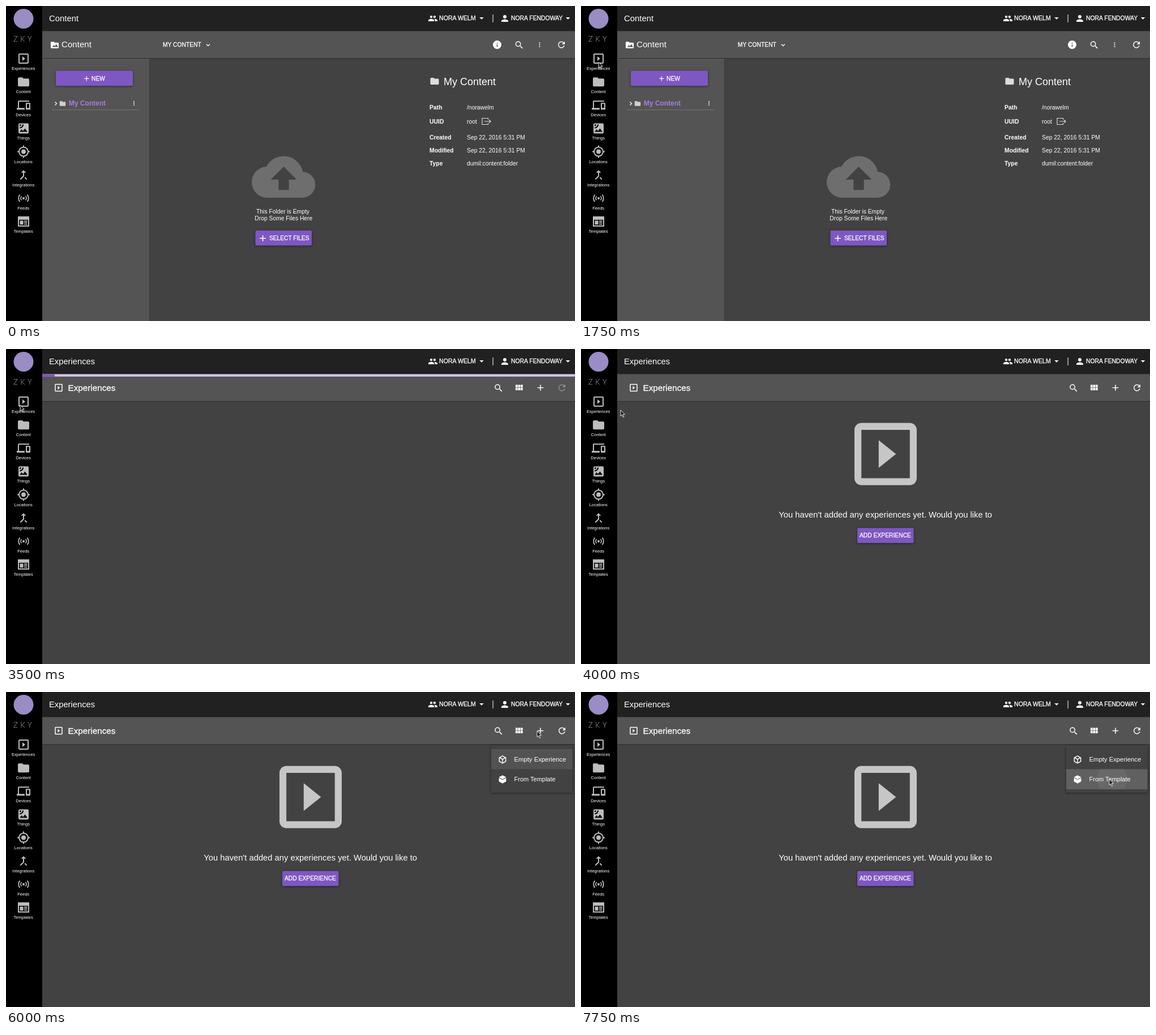
These frames come from a looping animation (1005 px wide and 557 px high, 8000 ms). An HTML page:

```html
<!DOCTYPE html>
<html lang="en">
<head>
<meta charset="utf-8">
<title>Content manager</title>
<style>
  html, body { margin: 0; width: 100%; height: 100%; overflow: hidden; background: #424242; }
  svg { display: block; width: 1005px; height: 557px; font-family: "Liberation Sans", Arial, sans-serif; }
  .medium { stroke: #fff; stroke-width: .3px; }
  .bold { font-weight: 700; }
  .thin { font-family: Lato, sans-serif; font-weight: 300; letter-spacing: 4.5px; }
  .middle { text-anchor: middle; }
  .raised { filter: drop-shadow(0 1px 2px rgba(0, 0, 0, .45)); }
</style>
</head>
<body>
<svg id="stage" viewBox="0 0 1005 557"></svg>
<script>
// Icon outlines on a 24 unit grid
const ICONS = {
  play: 'M10 8v8l5-4zM19 3H5c-1.1 0-2 .9-2 2v14c0 1.1.9 2 2 2h14c1.1 0 2-.9 2-2V5c0-1.1-.9-2-2-2zm0 16H5V5h14z',
  folder: 'M10 4H4c-1.1 0-2 .9-2 2v12c0 1.1.9 2 2 2h16c1.1 0 2-.9 2-2V8c0-1.1-.9-2-2-2h-8z',
  album: 'M10 4H4c-1.1 0-2 .9-2 2v12c0 1.1.9 2 2 2h16c1.1 0 2-.9 2-2V8c0-1.1-.9-2-2-2h-8zM6 17l4-5 2.5 3 3.5-5 4.5 7z',
  devices: 'M4 6h18V4H4c-1.1 0-2 .9-2 2v11H0v3h14v-3H4zM23 8h-6c-.6 0-1 .4-1 1v10c0 .6.4 1 1 1h6c.6 0 1-.4 1-1V9c0-.6-.4-1-1-1zm-1 9h-4v-7h4z',
  things: 'M19 3H5c-1.1 0-2 .9-2 2v14c0 1.1.9 2 2 2h14c1.1 0 2-.9 2-2V5c0-1.1-.9-2-2-2zM5 5h3c0 1.7-1.3 3-3 3zM5 12v-2c2.8 0 5-2.2 5-5h2c0 3.9-3.1 7-7 7zm0 6l3.5-4.5 2.5 3 3.5-4.5 4.5 6z',
  locations: 'M12 8a4 4 0 1 0 0 8a4 4 0 1 0 0-8zM20.9 11A9 9 0 0 0 13 3.1V1h-2v2.1A9 9 0 0 0 3.1 11H1v2h2.1A9 9 0 0 0 11 20.9V23h2v-2.1A9 9 0 0 0 20.9 13H23v-2zM12 19a7 7 0 1 1 0-14a7 7 0 1 1 0 14z',
  merge: 'M17 20.4L18.4 19 15 15.6 13.6 17zM7.5 8H11v5.6L5.6 19 7 20.4l6-6V8h3.5L12 3.5z',
  templates: 'M2 3h20v18H2zM4 9v10h16V9zM5.5 10.5h6v7h-6zM13 10.5h5.5v1.6H13zM13 13.2h5.5v1.6H13zM13 15.9h5.5v1.6H13z',
  cloud: 'M19.35 10A7.5 7.5 0 0 0 5.35 8A6 6 0 0 0 6 20h13a5 5 0 0 0 .35-10zM14 13v4h-4v-4H7l5-5 5 5z',
  people: 'M16 11a3 3 0 1 0-3-3a3 3 0 0 0 3 3zM8 11a3 3 0 1 0-3-3a3 3 0 0 0 3 3zM8 13c-2.3 0-7 1.2-7 3.5V19h14v-2.5C15 14.2 10.3 13 8 13zM16 13l-1 .1c1.2.8 2 1.9 2 3.4V19h6v-2.5c0-2.3-4.7-3.5-7-3.5z',
  person: 'M12 12a4 4 0 1 0-4-4a4 4 0 0 0 4 4zM12 14c-2.7 0-8 1.3-8 4v2h16v-2c0-2.7-5.3-4-8-4z',
  search: 'M15.5 14h-.8l-.3-.3A6.5 6.5 0 1 0 13.7 14.4l.3.3v.8l5 5 1.5-1.5zM9.5 14a4.5 4.5 0 1 1 0-9a4.5 4.5 0 1 1 0 9z',
  info: 'M12 2a10 10 0 1 0 0 20a10 10 0 1 0 0-20zM13 17h-2v-6h2zM13 9h-2V7h2z',
  dots: 'M12 8a2 2 0 1 0 0-4a2 2 0 1 0 0 4zM12 14a2 2 0 1 0 0-4a2 2 0 1 0 0 4zM12 20a2 2 0 1 0 0-4a2 2 0 1 0 0 4z',
  refresh: 'M17.65 6.35A8 8 0 1 0 19.7 14h-2.1A6 6 0 1 1 16.2 7.8L13 11h7V4z',
  grid: 'M4 5h5v6H4zM10 5h5v6h-5zM16 5h5v6h-5zM4 12h5v6H4zM10 12h5v6h-5zM16 12h5v6h-5z',
  add: 'M19 13h-6v6h-2v-6H5v-2h6V5h2v6h6z',
  down: 'M7 10l5 5 5-5z',
  box: 'M12 2.2L20.5 7v10L12 21.8 3.5 17V7zM12 4.5L7 7.3l5 2.8 5-2.8zM5.5 8.8v7l5.5 3.1v-7zM18.5 8.8v7L13 18.900v-7z',
  solidBox: 'M12 2.200l8.500 4.500-8.500 4.800-8.500-4.800zM3.500 8.200l8.500 4.800 8.500-4.800V17L12 21.800 3.500 17z'
};

const icon = (name, cx, cy, size = 18, fill = '#fff') => `<path d="${ICONS[name]}" fill="${fill}" fill-rule="evenodd"
  transform="translate(${cx - size / 2} ${cy - size / 2}) scale(${size / 24})"/>`;
const text = (str, x, cy, size, style = '', fill = '#fff') =>
  `<text x="${x}" y="${cy + size * .36}" font-size="${size}" class="${style}" fill="${fill}">${str}</text>`;
const rect = (x, y, w, h, fill, more = '') =>
  `<rect x="${x}" y="${y}" width="${w}" height="${h}" fill="${fill}" ${more}/>`;
const line = (d, width = 1.3, color = '#fff') =>
  `<path d="${d}" fill="none" stroke="${color}" stroke-width="${width}"/>`;
const group = (id, body) => `<g id="${id}">${body}</g>`;
const button = (x, y, w, h) => rect(x, y, w, h, '#7e57c2', 'rx="2" class="raised"');

const GREY = '#bdbdbd';

function sidebar() {
  const items = [['Experiences', 'play'], ['Content', 'folder'], ['Devices', 'devices'], ['Things', 'things'],
    ['Locations', 'locations'], ['Integrations', 'merge'], ['Feeds'], ['Templates', 'templates']];
  const waves = line('M27.500 336.400a5 5 0 0 0 0 7M34.500 336.400a5 5 0 0 1 0 7M24.500 333.700a9.500 9.500 0 0 0 0 12.400M37.500 333.700a9.500 9.500 0 0 1 0 12.400', 1.8, GREY)
    + `<circle cx="31" cy="339.900" r="2" fill="${GREY}"/>`;
  return rect(0, 0, 64, 557, '#000')
    + group('hover', rect(0, 78, 64, 41, '#3d3d3d') + '<circle id="navRipple" cx="30" cy="98" fill="#575757"/>')
    + '<circle cx="31" cy="22.500" r="17.500" fill="#9a8cc4"/>'
    + text('ZKY', 13, 58, 13, 'thin', '#b0b0b0')
    + items.map(([label, name], i) => {
      const y = 93 + i * 41.15;
      return (name ? icon(name, 31, y, 24, GREY) : waves) + text(label, 30.700, y + 17.300, 7.5, 'middle');
    }).join('');
}

function account() {
  return icon('people', 754, 22, 17.500) + text('NORA WELM', 765, 21.500, 10.600, 'medium') + icon('down', 840, 21.500)
    + rect(859.5, 15, 1.2, 14, '#ddd')
    + icon('person', 881, 22) + text('NORA FENDOWAY', 892, 21.500, 10.400, 'medium') + icon('down', 992.500, 21.500);
}

function contentPage() {
  const facts = [['Path', '/norawelm', 179.500], ['UUID', 'root', 204], ['Created', 'Sep 22, 2016 5:31 PM', 232],
    ['Modified', 'Sep 22, 2016 5:31 PM', 255], ['Type', 'dumil:content:folder', 278]];
  return text('Content', 76, 21.500, 14.900)
    + icon('album', 86, 69, 17) + text('Content', 98, 68, 15.100)
    + text('MY CONTENT', 277, 68.500, 10.300, 'medium') + line('M354 67.500l3 3 3-3')
    + icon('info', 867.500, 68.500) + icon('search', 906.500, 69) + icon('dots', 942.500, 68.500, 13) + icon('refresh', 981, 68.500)
    + rect(64, 93, 189, 464, '#545454') + rect(253, 93, 1, 464, '#3c3c3c')
    + button(88, 114.500, 136, 26.500) + icon('add', 142.300, 128.300, 14) + text('NEW', 151, 128, 10.300, 'medium')
    + line('M86.500 169.500l3 3-3 3') + icon('folder', 100, 172.500, 12.500, '#d0d0d0')
    + text('My Content', 111, 171.500, 11.950, 'bold', '#a080e0') + icon('dots', 226, 172, 12)
    + rect(81, 183.200, 155, 1, '#777')
    + icon('cloud', 490.500, 302.300, 110, '#6e6e6e')
    + text('This Folder is Empty', 489, 363.500, 10.300, 'middle') + text('Drop Some Files Here', 490.300, 375.500, 10.300, 'middle')
    + button(440.500, 397, 99.500, 26.500) + icon('add', 453.600, 410.800, 18) + text('SELECT FILES', 465, 410.500, 10.200, 'medium')
    + icon('folder', 757, 133, 18, '#ddd') + text('My Content', 773, 133.500, 18)
    + facts.map(([key, value, y]) => text(key, 748, y, 10.400, 'bold') + text(value, 814, y, 10.350)).join('')
    + line('M851.500 201v-2.500h-10.500v11h10.500v-2.500M845 204h11M853.300 201.300l2.800 2.700-2.800 2.700', 1.2, '#ddd');
}

function experiencePage() {
  return text('Experiences', 76, 21.500, 14.750)
    + icon('play', 93, 68.500) + text('Experiences', 109.500, 69, 15.250, 'medium')
    + icon('search', 870, 69) + icon('grid', 906, 68.500) + icon('add', 944, 68.500)
    + group('reload', icon('refresh', 982, 68.500))
    + group('progress', rect(64, 44.500, 941, 4.300, '#d1c4e9') + rect(64, 44.500, 0, 4.300, '#7e57c2', 'id="bar"'))
    + group('empty', icon('play', 538, 185.700, 146.670, '#c6c6c6')
      + text("You haven't added any experiences yet. Would you like to", 537.700, 293, 14.750, 'middle')
      + button(488, 316.500, 99.500, 26.500) + text('ADD EXPERIENCE', 537.500, 329.500, 10.300, 'medium middle'));
}

function menu() {
  return rect(857, 95, 143.500, 83, '#424242', 'rx="2" class="raised"')
    + rect(857, 101, 143.500, 35.500, '#525252', 'id="first"')
    + rect(857, 136.500, 143.500, 35.500, '#525252', 'id="second"')
    + '<clipPath id="row"><path d="M857 136.500h143.500v35.500H857z"/></clipPath>'
    + '<circle id="menuRipple" cx="938" cy="153" fill="#686868" clip-path="url(#row)"/>'
    + icon('box', 877, 119.500) + text('Empty Experience', 897.500, 119, 11.300)
    + icon('solidBox', 877, 154.500) + text('From Template', 897.500, 154, 11);
}

document.getElementById('stage').innerHTML =
  rect(0, 0, 1005, 557, '#424242') + rect(64, 0, 941, 44.500, '#212121')
  + rect(64, 44.500, 941, 48, '#545454') + rect(64, 92, 941, 1.300, '#333')
  + sidebar() + account()
  + group('contentPage', contentPage()) + group('experiencePage', experiencePage()) + group('menu', menu())
  + '<path id="cursor" d="M0 0v10.500l2.400-2.200 1.800 4.200 1.700-.7-1.800-4.100h3.300z" fill="#111" stroke="#fff" stroke-width=".9"/>';

const LOOP = 8000, STEP = 250;
// Pointer positions: time, x, y
const PATH = [[750, 203, 94], [1000, 110, 95], [1250, 55, 97], [1500, 34, 99], [1750, 31, 99], [2000, 31, 99],
  [2750, 25, 99], [3750, 25, 99], [4000, 70, 108], [4500, 518, 196], [4750, 800, 125], [5000, 930, 87],
  [5250, 938, 69], [6000, 938, 69], [6250, 940, 84], [6750, 936, 142], [7000, 933, 154], [LOOP, 933, 154]];

function pointer(t) {
  const i = Math.max(1, PATH.findIndex(p => p[0] >= t));
  const [t0, x0, y0] = PATH[i - 1], [t1, x1, y1] = PATH[i];
  const k = (t - t0) / (t1 - t0);
  return [x0 + (x1 - x0) * k, y0 + (y1 - y0) * k];
}

const el = id => document.getElementById(id);
const show = (id, on) => el(id).setAttribute('display', on ? 'inline' : 'none');
const set = (id, name, value) => el(id).setAttribute(name, value);

function draw(t) {
  const loaded = t >= 4000;
  show('contentPage', t < 3500);
  show('experiencePage', t >= 3500);
  show('hover', t >= 2750 && t < 3500);
  set('navRipple', 'r', t >= 3000 ? 11 : 0);

  show('progress', !loaded);
  set('bar', 'width', t < 3750 ? 22 : 330);
  set('reload', 'opacity', loaded ? 1 : .35);
  show('empty', loaded);

  show('menu', t >= 5750);
  set('menu', 'opacity', t < 6000 ? .7 : 1);
  show('first', t < 7500);
  show('second', t >= 6750);
  set('second', 'fill', t >= 7500 ? '#606060' : '#525252');
  set('menuRipple', 'r', t < 7500 ? 0 : t < 7750 ? 12 : 27);

  show('cursor', t >= 750);
  if (t >= 750) set('cursor', 'transform', `translate(${pointer(t)})`);
}

const start = performance.now();
function tick() {
  const t = (performance.now() - start) % LOOP;
  draw(Math.floor(t / STEP) * STEP);
  requestAnimationFrame(tick);
}
tick();
</script>
</body>
</html>
```
